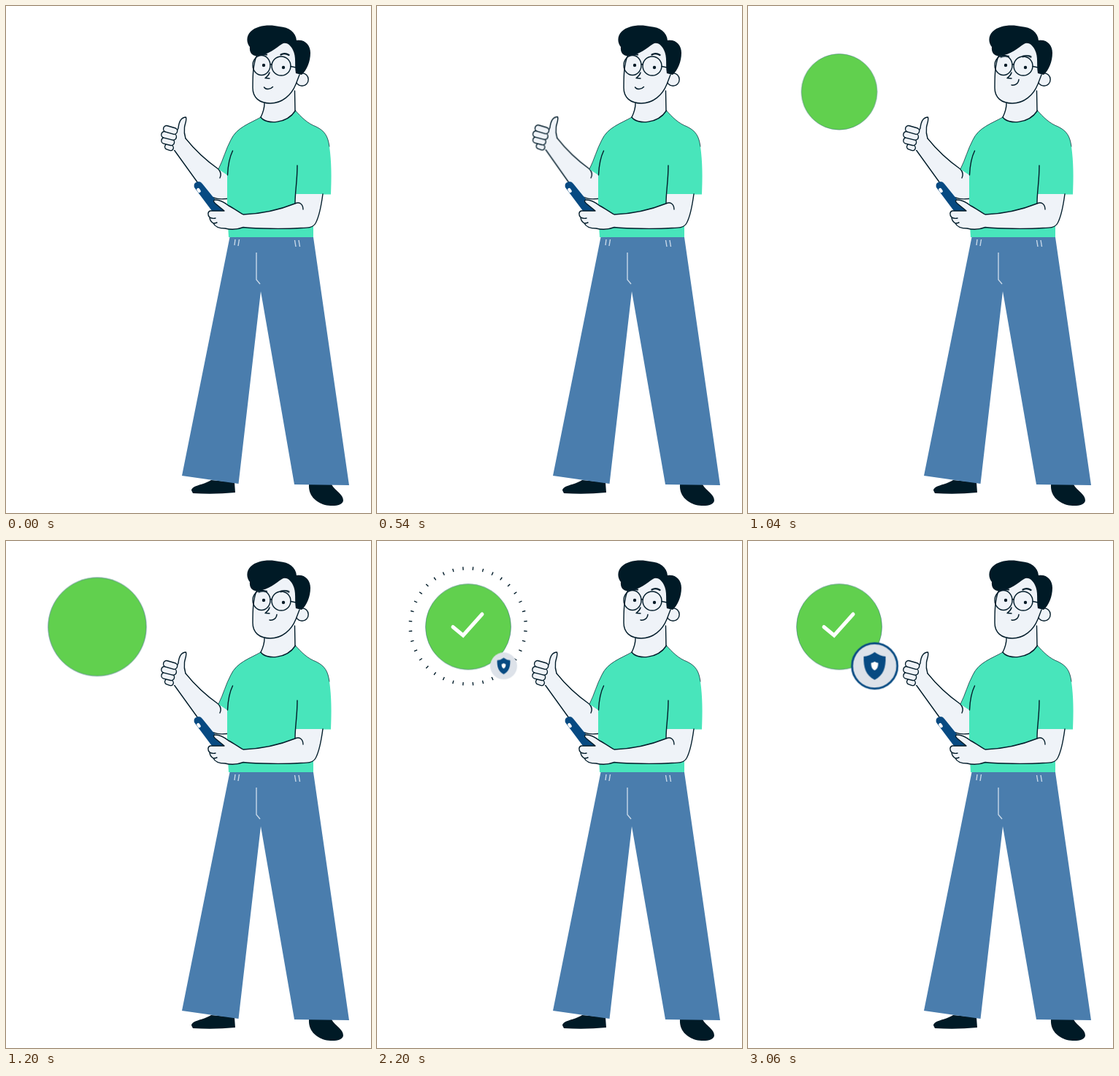
Recreate the animation shown at these times as an HTML page without scripts. Size 500x693 px, loop 4800 ms.

```html
<!DOCTYPE html>
<html lang="en">
<head>
<meta charset="utf-8">
<title>Thumbs up</title>
<style>
  html, body { margin: 0; width: 100%; height: 100%; overflow: hidden; background: #fff; }
  svg { display: block; width: 100%; height: 100%; }

  .skin { fill: #eff3f8; }
  .dark { fill: #001a26; }
  .shirt { fill: #48e5bb; }
  .navy { fill: #074a82; }
  .line { fill: none; stroke: #021c2a; stroke-width: 1.4; stroke-linecap: round; stroke-linejoin: round; }
  .skin.line { fill: #eff3f8; }
  .thin { stroke-width: .7; }
  .seam { fill: none; stroke: #c8d8e8; stroke-width: 1.4; }

  .arm, .disc, .check, .rays, .badge, .ring, .mouth, .brows { animation: 4.8s linear infinite; }

  .arm { transform-origin: 298px 250px; animation-name: wave; }
  .disc { fill: #61d04e; stroke: #35618a; stroke-width: .5; animation-name: pop; }
  .check { fill: none; stroke: #fff; stroke-width: 5; stroke-linecap: round; stroke-dasharray: 100 200; animation-name: tick; }
  .rays { fill: none; stroke: #021c2a; stroke-dasharray: 1 9; stroke-dashoffset: -4.5; animation-name: burst; }
  .badge { animation-name: grow; }
  .ring { fill: none; stroke: #074a82; stroke-width: 2.8; stroke-dasharray: 100 100; animation-name: draw; }
  .mouth { animation-name: smile; }
  .brows { stroke-width: 2.2; animation-name: frown; }

  @keyframes wave {
    0%, .4% { transform: rotate(0deg); animation-timing-function: ease-in-out; }
    6.4% { transform: rotate(4.4deg); animation-timing-function: ease-in-out; }
    12.9%, 100% { transform: rotate(0deg); }
  }
  @keyframes smile {
    0%, 12.9% { d: path("M353.5 111 C356 114.5 362 114.5 365.5 110.5"); animation-timing-function: ease-in-out; }
    21.7%, 100% { d: path("M361 108 C366 109 370.5 106 371 100.5"); }
  }
  @keyframes frown {
    0%, 13.3% { transform: translateY(0); animation-timing-function: ease-in-out; }
    18%, 25.4% { transform: translateY(2.5px); animation-timing-function: ease-in-out; }
    30.8%, 100% { transform: translateY(0); }
  }
  @keyframes pop {
    0%, 17.9% { transform: translate(125px, 117.3px) scale(0); animation-timing-function: ease-in-out; }
    23.75% { transform: translate(125px, 117.3px) scale(1.197); animation-timing-function: ease-in-out; }
    27.5%, 100% { transform: translate(125px, 117.3px) scale(1); }
  }
  @keyframes tick {
    0%, 27.1% { stroke-dashoffset: 112; animation-timing-function: ease-in-out; }
    33.3%, 100% { stroke-dashoffset: 0; }
  }
  @keyframes burst {
    0%, 34.16% { r: 56px; stroke-width: 0; }
    34.17% { r: 56px; stroke-width: 4.5px; }
    47.08% { r: 81.5px; stroke-width: 4.5px; }
    49.38%, 100% { r: 84px; stroke-width: 0; }
  }
  @keyframes grow {
    0%, 43.3% { transform: translate(173.5px, 170.8px) scale(0); animation-timing-function: ease-in-out; }
    47.9%, 100% { transform: translate(173.5px, 170.8px) scale(1); }
  }
  @keyframes draw {
    0%, 53.3% { stroke-dashoffset: 100; animation-timing-function: ease-in-out; }
    63.75%, 100% { stroke-dashoffset: 0; }
  }
</style>
</head>
<body>
<svg viewBox="0 0 500 693" preserveAspectRatio="none">
  <defs>
    <path id="shield" d="M0 -19 Q-7 -13.500 -15 -13 C-15.500 2 -12 13 0 19 C12 13 15.500 2 15 -13 Q7 -13.500 0 -19Z"/>
  </defs>

  <!-- approval sign -->
  <circle class="rays" cx="124.700" cy="116.400" r="56" pathLength="360"/>
  <circle class="disc" r="58.500"/>
  <path class="check" pathLength="100" d="M104 117.500 L118 129 L144 100"/>
  <g class="badge">
    <circle r="31" fill="#dde2e9"/>
    <use href="#shield" class="navy"/>
    <use href="#shield" fill="#fff" transform="scale(.32)"/>
  </g>
  <circle class="ring" cx="173.500" cy="170.800" r="31" pathLength="100" transform="rotate(-90 173.5 170.8)"/>

  <!-- legs -->
  <path class="dark" d="M254 662 C255 655 270 655 281 648 L313 651 L314 665 Q285 668 256 666Z"/>
  <path class="dark" d="M415 654 L446 654 C451 663 462 667 462 676 C461 684 446 684 437 682 C424 678 414 669 415 654Z"/>
  <path fill="#4a7dad" d="M306.500 316 H421 L470 655 L395 654 L349 390 L318.500 653 L241 642Z"/>
  <path class="seam" d="M314 319 L313 327 M319.500 319 L318 328 M395.500 320 L397 329 M401 320 L402.500 329 M343 337 V374 L348 380"/>

  <!-- raised arm -->
  <g class="arm">
    <path class="skin" d="M310 262 C297 265 284 265 276 257 C271 252 267 247 263 242 L230.500 197 L244 182 C258 198 272 210 292 224 L310 224Z"/>
    <path class="line" d="M310 262 C297 265 284 265 276 257 C271 252 267 247 263 242 L230.500 197 M246 181 C258 196 274 211 291 223 C294.500 227 295 231 293 235"/>
    <path class="skin" d="M246 181 C244 175 244 170 244.500 166 C245 161 248 156 246.500 152 C240 152 237 157 236 165 L226 168 L224 196 L231 197Z"/>
    <path class="line" d="M246 181 C244 175 244 170 244.500 166 C245 161 248 156 246.500 152 C240 152 237 157 236 167 L234 171"/>
    <g class="skin line">
      <rect x="217.500" y="189.500" width="12" height="7.500" rx="3.700" transform="rotate(20 224 193)"/>
      <rect x="212.800" y="181" width="18" height="8.500" rx="4.200" transform="rotate(14 222 185)"/>
      <rect x="212.700" y="173" width="21" height="8.700" rx="4.300" transform="rotate(14 223 177)"/>
      <rect x="215.500" y="165" width="19.500" height="8.700" rx="4.300" transform="rotate(16 225 169)"/>
    </g>
  </g>

  <!-- neck and shirt -->
  <path class="skin" d="M354 125 C354 138 352 145 349 152 C356 165 386 162 397 143 L395 110Z"/>
  <path class="line" d="M354 133 C354 140 352 146 349 152 M395.500 116 L396 143"/>
  <path class="shirt" d="M349 152 C356 162 384 162 396.500 143 C405 152 412 160 425 165 C437 171 441 178 443 192 C446 213 446 235 445 257.500 H421 V316 H305 L303 283 V231 L291 223 C298 209 301 196 308 183 C316 166 333 161 349 152Z"/>
  <path class="line thin" d="M291 223 C298 209 301 196 308 183 C316 166 333 161 349 152 M396.500 143 C405 152 412 160 425 165 C437 171 441 178 443 192"/>
  <path class="line" d="M349 152 C356 162 384 162 396.500 143 M310.500 198 C306 207 304 219 303.500 231"/>

  <!-- phone and resting arm -->
  <path class="navy" d="M258 248 Q256 241 264 240 Q267 240 269 243 L299 280 H282Z"/>
  <rect x="262" y="248.500" width="4" height="7" rx="2" fill="#fff" transform="rotate(-35 264 252)"/>
  <path id="rest" class="skin" d="M396 257 H434 C432 272 429 288 424 297 C420 303.500 413 303.500 404 303.500 C380 305 345 304.500 325 302.500 C316 306 308 306 300 304 C292 304 286 301 284 297 C281 295 279 292 279 289 C276 286 276 281 280 280 L299 280 L288 271 C284 268 283 265 287 265 C294 265 300 269 305 273 C311 276 318 281 325 285 C350 284 376 278 396 270Z"/>
  <path class="line" d="M434 257 C432 272 429 288 424 297 C420 303.500 413 303.500 404 303.500 C380 305 345 304.500 325 302.500 C316 306 308 306 300 304 C292 304 286 301 284 297 C281 295 279 292 279 289 C276 286 276 281 280 280 L299 280 L288 271 C284 268 283 265 287 265 C294 265 300 269 305 273 C311 276 318 281 325 285 C350 284 376 278 396 270 C402 267 407 271 407 278 M399 218 C399 240 396 252 396 270 M279 289 Q283 291 287 290 M284 297 Q287 297 289 296"/>

  <!-- head -->
  <circle class="skin line" cx="405.500" cy="100.500" r="8.700"/>
  <path class="skin" d="M344 64 C338 80 338 97 338 112 C338 125 347 133 362 133 C378 133 391 122 397 107 L403 92 L398 50 H360Z"/>
  <path class="line" d="M344 66 C338 80 338 97 338 112 C338 125 347 133 362 133 C378 133 391 122 397 107 L402 94"/>
  <path class="dark" d="M345 68 C338 69 333 64 334 56 C329 50 329 41 335 35 C344 26 362 25 374 28 C388 29 397 36 398 47 C409 45 417 53 417 64 C417 76 412 88 405 94 L397 92 C395 80 398 70 393 60 C389 52 383 49 378 52 C370 57 360 67 345 68Z"/>
  <g class="line">
    <ellipse cx="350" cy="81" rx="12" ry="13.500"/>
    <circle cx="377" cy="82" r="13"/>
    <path d="M362 80 Q363 79 364 80 M390 82.500 L397 84 M361 91 C360 95 357 97 355 98.500 L361 99"/>
    <path class="mouth" d="M353.500 111 C356 114.500 362 114.500 365.500 110.500"/>
    <path class="brows" d="M346.500 67 Q351 65 357 66.500 M376.500 66.500 Q382 63.500 387.500 67"/>
  </g>
  <circle class="dark" cx="353" cy="81" r="2.200"/>
  <circle class="dark" cx="380" cy="84" r="2.200"/>
</svg>
</body>
</html>
```
